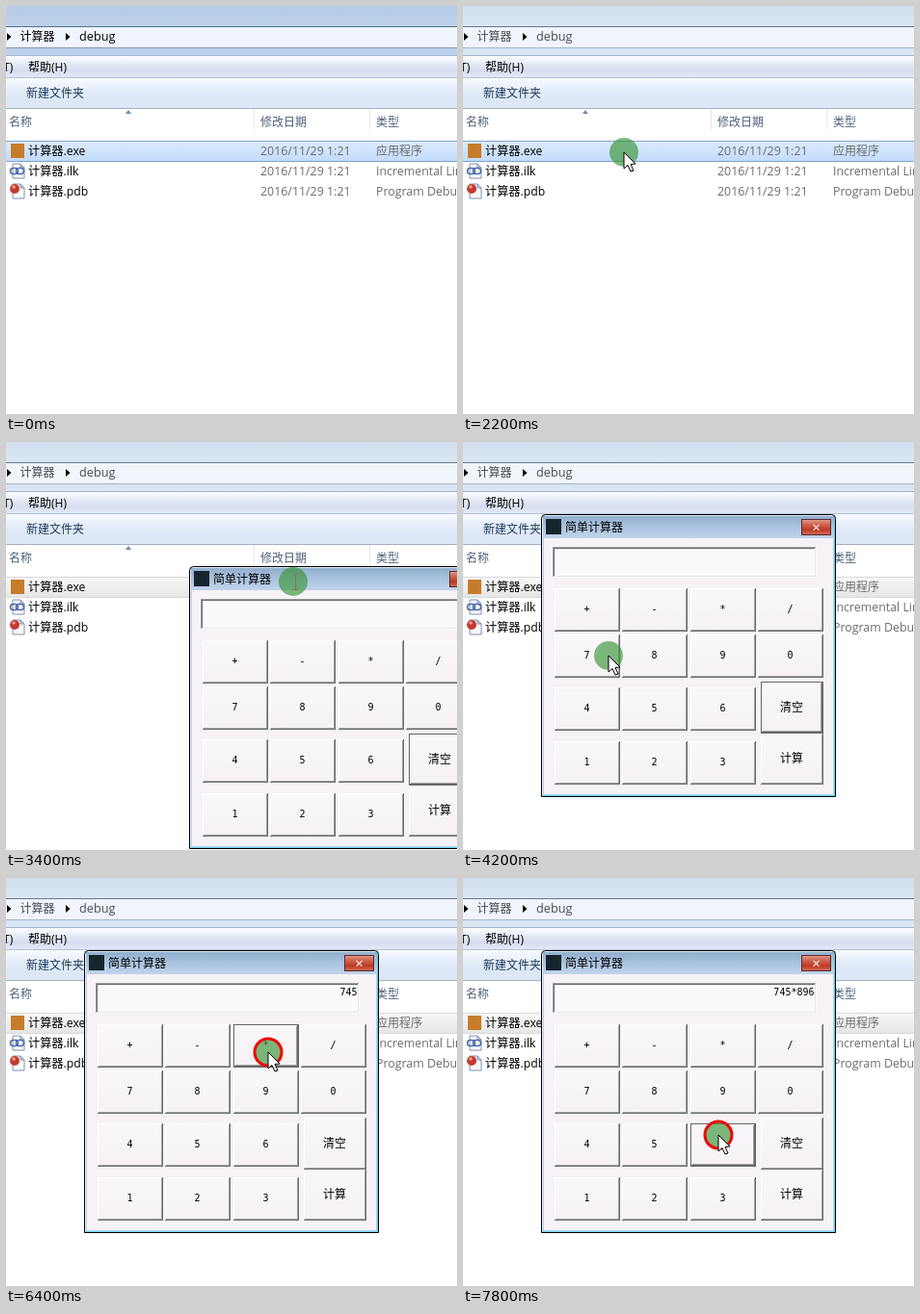
Write an HTML page with a canvas that moves like this. It is 468 by 424 pixels and loops after 8000 ms.

```html
<!DOCTYPE html>
<html lang="zh-CN">
<head>
<meta charset="utf-8">
<style>
html, body { margin: 0; width: 468px; height: 424px; overflow: hidden; background: #fff; }
canvas { display: block; }
</style>
</head>
<body>
<canvas id="stage" width="468" height="424"></canvas>
<script>
const ctx = document.getElementById('stage').getContext('2d');
const UI = '"Open Sans", "Noto Sans CJK SC", "Noto Sans CJK", sans-serif';
const MONO = '"DejaVu Sans Mono", monospace';
const LOOP = 8000, STEP = 200;

// [time, x, y] of the pointer
const path = [
  [1400, 215, 266], [1800, 175, 165], [2200, 167, 152], [2600, 167, 152],
  [3400, 298, 145], [3600, 192, 93], [3800, 189, 91], [4200, 151, 222],
  [4600, 140, 228], [4800, 140, 228], [5200, 138, 284], [5600, 209, 282],
  [5800, 209, 282], [6200, 270, 184], [6400, 272, 181], [6800, 205, 215],
  [7000, 204, 214], [7400, 265, 222], [7800, 265, 267]
];
// [press, release, time of display, key]
const clicks = [
  [4600, 4800, 4800, '7'], [5200, 5400, 5400, '4'], [5600, 5800, 5800, '5'],
  [6400, 6600, 6600, '*'], [6800, 7200, 7000, '8'], [7400, 7600, 7600, '9'],
  [7800, 8000, 7800, '6']
];

function rect(x, y, w, h, color) {
  ctx.fillStyle = color;
  ctx.fillRect(x, y, w, h);
}

function shade(x, y, w, h, ...colors) {
  const g = ctx.createLinearGradient(0, y, 0, y + h);
  colors.forEach((c, i) => g.addColorStop(i / (colors.length - 1), c));
  rect(x, y, w, h, g);
}

// one pixel frame, lit from the top left
function bevel(x, y, w, h, light, dark = light) {
  rect(x, y, w, 1, light);
  rect(x, y, 1, h, light);
  rect(x, y + h - 1, w, 1, dark);
  rect(x + w - 1, y, 1, h, dark);
}

function text(s, x, y, color = '#000', size = 12, align = 'left', family = UI) {
  ctx.font = `${size}px ${family}`;
  ctx.textAlign = align;
  ctx.fillStyle = color;
  ctx.fillText(s, x, y);
}

function poly(points, fill, stroke) {
  ctx.beginPath();
  points.forEach(([x, y]) => ctx.lineTo(x, y));
  ctx.closePath();
  ctx.fillStyle = fill;
  ctx.fill();
  if (stroke) {
    ctx.strokeStyle = stroke;
    ctx.lineWidth = 1;
    ctx.stroke();
  }
}

function disc(x, y, r, color) {
  ctx.beginPath();
  ctx.arc(x, y, r, 0, 7);
  ctx.fillStyle = color;
  ctx.fill();
}

function page(y) {
  poly([[7, y], [15, y], [19, y + 4], [19, y + 15], [7, y + 15]], '#f5f8fd', '#8290ac');
  poly([[15, y], [15, y + 4], [19, y + 4]], '#ccd6e8', '#8290ac');
}

function explorer(t) {
  const active = t < 200 || t === 2400;
  const hover = t >= 2000 && t < 2600;
  if (active) shade(0, 0, 468, 21, '#b5cce6', '#bdd2ea');
  else shade(0, 0, 468, 21, '#d0deed', '#dae6f3');
  rect(0, 21, 468, 1, active ? '#54708f' : '#66788c');
  rect(0, 22, 468, 21, active ? '#f0f5ff' : '#f1f5fb');
  rect(0, 43, 468, 1, active ? '#7e98b7' : '#a5b4c7');
  shade(0, 44, 468, 7, active ? '#b9d0ea' : '#d7e3f2', active ? '#bdd3ec' : '#dbe6f4');
  rect(0, 51, 468, 1, '#a2b5cd');
  shade(0, 52, 468, 22, '#fcfdff', '#e7edf8', '#d5ddee', '#e2e9f6');
  rect(0, 74, 468, 1, '#b4c1d6');
  shade(0, 75, 468, 31, '#f9fbff', '#e6effa', '#dce7f7', '#dde8f7');
  rect(0, 106, 468, 1, '#a0afc3');

  const ink = active ? '#000' : '#444b54';
  for (const x of [1, 62]) poly([[x, 28], [x + 4.5, 32], [x, 36]], '#000');
  text('计算器', 14.5, 36, ink);
  text('debug', 76, 36, ink, 12.7);
  text('T)', -3, 68);
  text('帮助(H)', 23, 68);
  text('新建文件夹', 21, 95, '#1e395b');

  for (const x of [257, 377]) shade(x, 107, 1, 21, '#dfe5ee', '#e5eaf2');
  poly([[124, 112], [127, 108], [130, 112]], '#6c8cae');
  text('名称', 3, 125, '#4c607a');
  text('修改日期', 264, 125, '#4c607a');
  text('类型', 384, 125, '#4c607a');

  const lit = active || hover;
  shade(0, 140, 468, 22, lit ? '#dcebfc' : '#f8f8f8', lit ? '#c1dbfc' : '#e5e5e5');
  for (const y of [140, 161]) rect(0, y, 468, 1, lit ? '#7da2ce' : '#d9d9d9');

  rect(5, 143, 14, 15, '#c77c2c');
  page(164);
  ctx.strokeStyle = '#4e6da8';
  ctx.lineWidth = 1.6;
  for (const x of [4.5, 10.5]) {
    ctx.beginPath();
    ctx.roundRect(x, 168.5, 8, 6, 3);
    ctx.stroke();
  }
  page(185);
  disc(9, 190, 5, '#c33a30');
  disc(8, 188, 1.8, '#ef9a8c');

  [['exe', '应用程序'], ['ilk', 'Incremental Linker File'], ['pdb', 'Program Debug Database']]
    .forEach(([ext, type], i) => {
      const y = 155 + 21 * i;
      text('计算器.' + ext, 23, y, '#000', 12.2);
      text('2016/11/29 1:21', 264, y, '#6d6d6d', 12.4);
      text(type, 384, y, '#6d6d6d', i ? 12.4 : 12);
    });
}

function button(label, x, y, w, h, focus) {
  const [textX, textY] = [x + w / 2 - 1, Math.floor(y + h / 2) + 3];
  shade(x, y, w, h, '#faf7fa', '#f5f1f5');
  if (focus) {
    bevel(x, y, w, h, '#646464');
    x++, y++, w -= 2, h -= 2;
  }
  bevel(x, y, w, h, '#fff', '#696969');
  rect(x + 1, y + h - 2, w - 2, 1, '#a0a0a0');
  rect(x + w - 2, y + 1, 1, h - 2, '#a0a0a0');
  if (label.length > 1) text(label, textX + .5, textY + 1, '#000', 12, 'center');
  else text(label, textX + .5, textY, '#000', 10, 'center', MONO);
}

function calculator(t) {
  const [dx, dy] = t < 3600 ? [190, 129] : t < 3800 ? [84, 77] : [81, 75];
  const focus = clicks.filter(c => t >= c[0]).map(c => c[3]).pop() || '清空';
  const shown = clicks.filter(c => t >= c[2]).map(c => c[3]).join('');
  ctx.save();
  ctx.translate(dx, dy);
  ctx.beginPath();
  ctx.roundRect(0, 0, 306, 294, [4, 4, 0, 0]);
  ctx.clip();
  rect(0, 0, 306, 294, '#b9d1ea');
  shade(1, 1, 304, 24, '#8eaccb', '#a9c3df', '#c0d5eb');
  bevel(1, 1, 304, 292, '#e4f0fa', '#62d2ee');
  rect(3, 25, 300, 266, '#f6f2f6');
  ctx.beginPath();
  ctx.roundRect(.5, .5, 305, 293, [4, 4, 0, 0]);
  ctx.strokeStyle = '#000';
  ctx.lineWidth = 1;
  ctx.stroke();

  rect(5, 5, 16, 16, '#17252d');
  text('简单计算器', 25, 17.5);
  shade(270, 5, 31, 17, '#e3a294', '#d06350', '#bd3a25', '#d4715c');
  bevel(270, 5, 31, 17, '#5b2b2b');
  text('×', 285.5, 18.5, '#fff', 15, 'center');

  rect(12, 34, 274, 32, '#fbf9fb');
  bevel(12, 34, 274, 32, '#a0a0a0', '#fff');
  bevel(13, 35, 272, 30, '#696969', '#e3e3e3');
  text(shown, 283.5, 47, '#000', 10, 'right', MONO);

  const tops = [77, 125, 180, 236];
  ['+-*/', '7890', '456', '123'].forEach((keys, row) => {
    [...keys].forEach((key, col) =>
      button(key, [14, 84, 155, 225][col], tops[row], 68, 45, key === focus));
  });
  button('清空', 228, 174, 65, 54, focus === '清空');
  button('计算', 228, 228, 65, 53, false);
  ctx.restore();
}

function pointer(t) {
  if (t < path[0][0]) return;
  const i = Math.max(1, path.findIndex(p => p[0] >= t));
  const [a, b] = [path[i - 1], path[i]];
  const k = (t - a[0]) / (b[0] - a[0]);
  const x = Math.round(a[1] + (b[1] - a[1]) * k);
  const y = Math.round(a[2] + (b[2] - a[2]) * k);
  disc(x, y, 15, 'rgba(58,148,56,.66)');
  if (t === 2400 || clicks.some(c => t >= c[0] && t < c[1])) {
    ctx.beginPath();
    ctx.arc(x, y, 14, 0, 7);
    ctx.strokeStyle = '#f00808';
    ctx.lineWidth = 3;
    ctx.stroke();
  }
  if (t === 3400) {
    rect(x + 2, y - 8, 1, 17, '#9b6570');
    rect(x, y - 8, 5, 1, '#9b6570');
    rect(x, y + 8, 5, 1, '#9b6570');
    return;
  }
  const arrow = [[0, 0], [0, 17], [4, 13.5], [7, 20], [10, 19], [7, 12.5], [12, 12]];
  poly(arrow.map(([px, py]) => [x + px, y + py]), '#fff', '#000');
}

function draw(now) {
  const t = Math.floor(now % LOOP / STEP) * STEP;
  rect(0, 0, 468, 424, '#fff');
  explorer(t);
  if (t >= 2600) calculator(t);
  pointer(t);
  requestAnimationFrame(draw);
}
requestAnimationFrame(draw);
</script>
</body>
</html>
```
